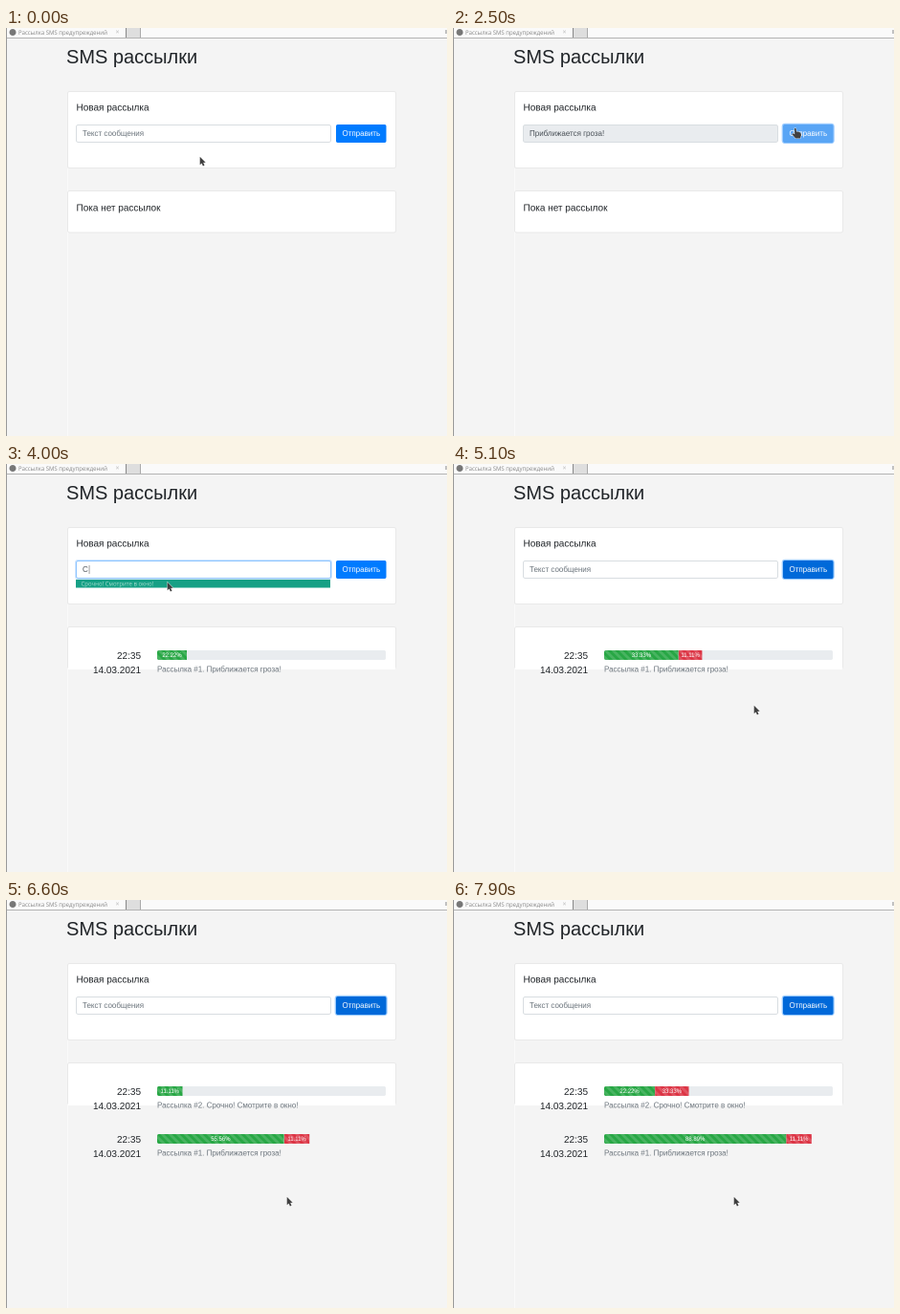
Write an HTML page with a canvas that moves like this. It is 461x427 px and loops after 8 s.

```html
<!DOCTYPE html>
<html lang="ru">
<head>
<meta charset="utf-8">
<title>SMS рассылки</title>
<style>
  html, body { margin: 0; width: 100%; height: 100%; overflow: hidden; background: #f4f4f4; }
  canvas { display: block; width: 461px; height: 427px; }
</style>
</head>
<body>
<canvas id="stage"></canvas>
<script>
const W = 461, H = 427, LOOP = 8000, TICK = 100;
const SANS = '"Liberation Sans", Arial, sans-serif';
const UI = '"Open Sans", "Noto Sans", sans-serif';
const INK = '#212529';

// The page is painted at double size and shown at half, like a scaled-down recording
const ZOOM = 2;
const canvas = document.getElementById('stage');
const ctx = canvas.getContext('2d');
canvas.width = W * ZOOM;
canvas.height = H * ZOOM;

// Each message: focus the field, type a letter, pick the hint, send, get the answer
const SENDS = [
  { text: 'Приближается гроза!', focus: 400, type: 600, pick: 900, send: 1800, done: 2800 },
  { text: 'Срочно! Смотрите в окно!', focus: 3500, type: 3800, pick: 4200, send: 4600, done: 4900 }
];

const FIELD = [190, 111], HINT = [169, 124], BUTTON = [357, 105], REST = [294, 311];
const PATH = [{ t: 200, at: [203, 135] }];
for (const s of SENDS) {
  PATH.push(
    { t: s.focus, at: FIELD }, { t: s.type, at: FIELD },
    { t: s.type + 100, at: HINT }, { t: s.pick, at: HINT },
    { t: s.send - 100, at: BUTTON }, { t: s.done, at: BUTTON }
  );
}
PATH.push({ t: 1100, at: [213, 113] }, { t: 5100, at: [315, 253] }, { t: 5300, at: REST });
PATH.sort((a, b) => a.t - b.t);

// Progress is polled; one digit per poll, out of PEOPLE
const PEOPLE = 9, POLL = 780, FIRST_POLL = 3135;
const MAILINGS = [
  { born: 2800, poll: 0, sent: '1235578', failed: '0011111' },
  { born: 5475, poll: 3, sent: '1122', failed: '0013' }
];

const clamp = v => Math.max(0, Math.min(1, v));
const mix = (a, b, k) => a + (b - a) * k;
const bezier = (a, b, s) => 3 * a * s * (1 - s) ** 2 + 3 * b * s * s * (1 - s) + s ** 3;

// CSS "ease"
function ease(x) {
  let lo = 0, hi = 1;
  for (let i = 0; i < 20; i++) {
    const mid = (lo + hi) / 2;
    if (bezier(.25, .25, mid) < x) lo = mid; else hi = mid;
  }
  return bezier(.1, 1, lo);
}

function pointerAt(t) {
  const next = PATH.findIndex(p => p.t > t);
  if (next < 0) return REST;
  const b = PATH[next], a = PATH[next - 1] || b;
  const k = a === b ? 0 : (t - a.t) / (b.t - a.t);
  return [mix(a.at[0], b.at[0], k), mix(a.at[1], b.at[1], k)];
}

function formAt(t) {
  const s = SENDS.filter(m => m.focus <= t).pop();
  if (!s) return { value: '', mode: 'idle' };
  if (t >= s.done) return { value: '', mode: 'focus' };
  if (t >= s.send) return { value: s.text, mode: 'busy' };
  const picked = t >= s.pick, typed = t >= s.type;
  return {
    value: picked ? s.text : typed ? s.text[0] : '',
    hint: typed && !picked ? s.text : '',
    editing: true,
    mode: t >= s.send - 100 ? 'hover' : 'idle'
  };
}

function rect(x, y, w, h, fill) {
  ctx.fillStyle = fill;
  ctx.fillRect(x, y, w, h);
}

function box(x, y, w, h, r, fill, stroke) {
  ctx.beginPath();
  ctx.roundRect(x, y, w, h, r);
  if (fill) { ctx.fillStyle = fill; ctx.fill(); }
  if (stroke) { ctx.strokeStyle = stroke; ctx.lineWidth = 1; ctx.stroke(); }
}

// Returns the width of the text
function text(str, x, y, size, color, align = 'left', family = SANS) {
  ctx.save();
  ctx.scale(1 / ZOOM, 1 / ZOOM);
  ctx.font = size * ZOOM + 'px ' + family;
  ctx.textAlign = align;
  ctx.fillStyle = color;
  ctx.fillText(str, x * ZOOM, y * ZOOM);
  const width = ctx.measureText(str).width / ZOOM;
  ctx.restore();
  return width;
}

function shape(points, x, y) {
  ctx.beginPath();
  points.forEach(([a, b]) => ctx.lineTo(x + a, y + b));
  ctx.closePath();
  ctx.lineJoin = 'round';
  ctx.lineWidth = 1;
  ctx.strokeStyle = 'rgba(255,255,255,.7)';
  ctx.stroke();
  ctx.fillStyle = '#404040';
  ctx.fill();
}

function drawTabs() {
  rect(0, 0, W, 10, '#fafafa');
  rect(126, 0, 14, 10, '#dedede');
  rect(125, 0, 1, 10, '#888');
  rect(140, 0, 1, 10, '#aaa');
  rect(0, 10, W, 1, '#b4b4b4');
  rect(0, 0, 1, H, '#999');
  rect(459.5, 2, 1, 4, '#888');
  ctx.fillStyle = '#777';
  ctx.beginPath();
  ctx.arc(7, 4.5, 3.5, 0, 7);
  ctx.fill();
  text('Рассылка SMS предупреждений', 13, 6.8, 6, '#888', 'left', UI);
  text('×', 116.5, 6.5, 7, '#bbb', 'center', UI);
}

function drawForm(t) {
  const { value, hint, editing, mode } = formAt(t);
  box(64.5, 66.5, 343, 80, 2, '#fff', '#e9e9e9');
  text('Новая рассылка', 73.5, 86.5, 10, INK);

  if (editing) box(72, 100, 269, 21, 3, '#cfe6ff');
  box(73.5, 101.5, 266, 18, 2, mode === 'busy' ? '#e9ecef' : '#fff', editing ? '#8fc5ff' : '#d8dde1');
  const width = text(value || 'Текст сообщения', 80, 113.2, 8, value ? '#495057' : '#6c757d');
  if (editing) rect(81 + (value && width), 106, .5, 9, '#444');

  const fill = { idle: '#007bff', hover: '#0069d9', focus: '#0069d9', busy: '#59a5f5' }[mode];
  if (mode === 'focus' || mode === 'busy') box(343.7, 99.7, 55, 21.4, 3.2, '#9bcbff');
  box(345, 101, 52.5, 19, 2, fill);
  text('Отправить', 371.3, 113.2, 8, '#fff', 'center');

  if (hint) {
    rect(73, 121, 266, 8.5, '#16a085');
    text(hint, 78.5, 127.4, 6, '#a5dccf', 'left', UI);
  }
}

function segment(x, y, w, color, count, t) {
  if (w <= 0) return;
  ctx.save();
  ctx.beginPath();
  ctx.rect(x, y, w, 10);
  ctx.clip();
  rect(x, y, w, 10, color);
  ctx.fillStyle = 'rgba(255,255,255,.15)';
  const shift = 8 * (1 - t % 1000 / 1000);
  for (let s = x - 24 + shift; s < x + w; s += 8) {
    ctx.beginPath();
    ctx.moveTo(s, y);
    ctx.lineTo(s + 4, y);
    ctx.lineTo(s + 14, y + 10);
    ctx.lineTo(s + 10, y + 10);
    ctx.fill();
  }
  text((count / PEOPLE * 100).toFixed(2) + '%', x + w / 2, y + 7.1, 6, '#fff', 'center');
  ctx.restore();
}

function drawMailing(m, y, track, t) {
  const full = 239;
  const poll = Math.floor((t - FIRST_POLL) / POLL);
  const k = ease(clamp((t - FIRST_POLL - poll * POLL) / 600));
  const count = (log, n) => Number(log[n - m.poll] || 0);
  const width = log => mix(count(log, poll - 1), count(log, poll), k) / PEOPLE * full;
  const sent = width(m.sent), failed = width(m.failed);

  text('22:35', 141, y + 9, 10, INK, 'right');
  text('14.03.2021', 141, y + 24, 10, INK, 'right');
  if (track) box(158, y, full, 10, 2, '#e9ecef');
  ctx.save();
  ctx.beginPath();
  ctx.roundRect(158, y, full, 10, 2);
  ctx.clip();
  segment(158, y, sent, '#28a745', count(m.sent, poll), t);
  segment(158 + sent, y, failed, '#dc3545', count(m.failed, poll), t);
  ctx.restore();
  const id = MAILINGS.indexOf(m);
  text(`Рассылка #${id + 1}. ${SENDS[id].text}`, 158, y + 22.7, 8, '#6c757d');
}

function drawList(t) {
  const rows = MAILINGS.filter(m => m.born <= t).reverse();
  box(64.5, 170.5, 343, 43.5, 2, '#fff', '#e9e9e9');
  if (!rows.length) {
    text('Пока нет рассылок', 73.5, 191.6, 10, INK);
    return;
  }
  rect(65, 211, 342, 4, '#fff');
  rows.forEach((m, i) => drawMailing(m, 195 + 50 * i, i === 0, t));
}

function drawArrow(x, y) {
  shape([[0, 0], [0, 8.6], [1.9, 6.8], [3.2, 9.8], [4.8, 9.1], [3.5, 6.2], [6, 6]], x - .3, y - .3);
}

function drawBeam(x, y) {
  rect(x - .3, y - 4, .7, 8, '#444');
  for (const end of [-4, 4]) rect(x - 1.7, y + end - .3, 3.5, .6, '#444');
}

function drawHand(x, y) {
  shape([[0, 0], [1.5, 0], [2, 3.5], [4, 3.5], [6.4, 4.6], [7, 7], [5.9, 10.5],
    [1.2, 10.5], [-2.6, 6.2], [-1.7, 5.1], [.2, 6.3]], x, y);
}

function drawPointer(t) {
  const [x, y] = pointerAt(t);
  const onRow = y > 101 && y < 120;
  if (onRow && x > 73 && x < 340) drawBeam(x, y);
  else if (onRow && x > 345 && x < 398) drawHand(x, y);
  else drawArrow(x, y);
}

function draw(t) {
  ctx.setTransform(ZOOM, 0, 0, ZOOM, 0, 0);
  rect(0, 0, W, H, '#f4f4f4');
  rect(64, 147, 1, H - 147, '#fafafa');
  drawTabs();
  text('SMS рассылки', 63, 37, 20, INK);
  drawForm(t);
  drawList(t);
  drawPointer(t);
}

const start = performance.now();
function loop(now) {
  const t = Math.max(0, now - start) % LOOP;
  draw(Math.floor(t / TICK) * TICK);
  requestAnimationFrame(loop);
}
draw(0);
requestAnimationFrame(loop);
</script>
</body>
</html>
```
